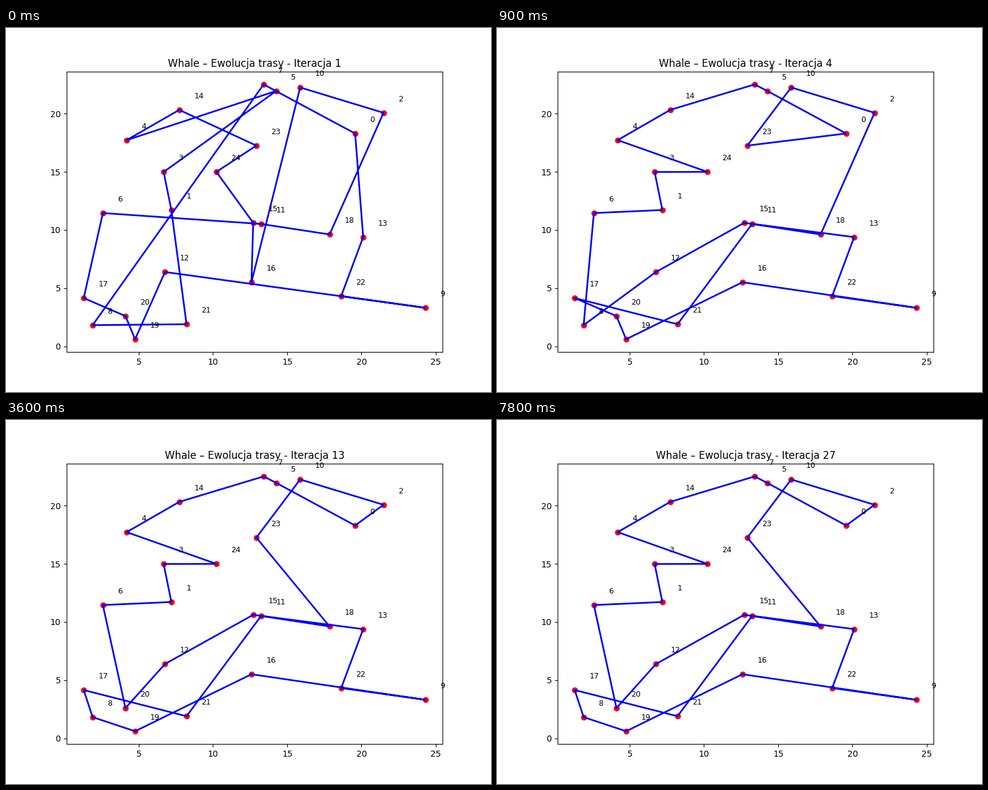
A matplotlib script for the animation above (8000 ms loop, 800 by 600 pixels).

```python
import numpy as np
import matplotlib.pyplot as plt
from matplotlib.animation import FuncAnimation

TICK_MS, LOOP_MS, STEP_MS = 100, 8000, 300

# City number -> position, listed in the order of the first route
CITIES = {
    0: (19.57, 18.30), 13: (20.11, 9.39), 22: (18.63, 4.32), 9: (24.30, 3.31),
    12: (6.77, 6.39), 19: (4.76, 0.61), 20: (4.11, 2.60), 17: (1.30, 4.15),
    6: (2.59, 11.46), 11: (13.24, 10.52), 18: (17.85, 9.62), 2: (21.48, 20.08),
    10: (15.87, 22.26), 16: (12.59, 5.51), 15: (12.71, 10.62), 24: (10.23, 15.00),
    23: (12.92, 17.26), 14: (7.73, 20.33), 4: (4.19, 17.73), 5: (14.26, 21.96),
    3: (6.68, 14.99), 1: (7.20, 11.72), 21: (8.22, 1.90), 8: (1.90, 1.82),
    7: (13.41, 22.52),
}

# Iteration -> pairs of cities that trade places in the best route
SWAPS = {
    2: [(5, 24), (12, 23), (12, 7)],
    4: [(0, 15), (16, 23), (6, 21)],
    7: [(2, 23), (8, 20)],
}


def best_route(iteration):
    route = list(CITIES)
    for step, pairs in SWAPS.items():
        if step <= iteration:
            for a, b in pairs:
                i, j = route.index(a), route.index(b)
                route[i], route[j] = b, a
    return route


def closed_path(route):
    return np.array([CITIES[city] for city in route + route[:1]])


fig, ax = plt.subplots(figsize=(8, 6), dpi=100)
ax.scatter(*zip(*CITIES.values()), c="red")
for number, (x, y) in CITIES.items():
    ax.text(x + 1, y + 1, str(number), fontsize=9)
ax.set(xlim=ax.get_xlim(), ylim=ax.get_ylim())
route_line, = ax.plot([], [], "b-", lw=2)
title = ax.set_title("")


def update(tick):
    iteration = tick * TICK_MS // STEP_MS + 1
    route_line.set_data(*closed_path(best_route(iteration)).T)
    title.set_text(f"Whale – Ewolucja trasy - Iteracja {iteration}")
    return route_line, title


anim = FuncAnimation(fig, update, frames=LOOP_MS // TICK_MS,
                     interval=TICK_MS, repeat=True)
plt.show()
```
